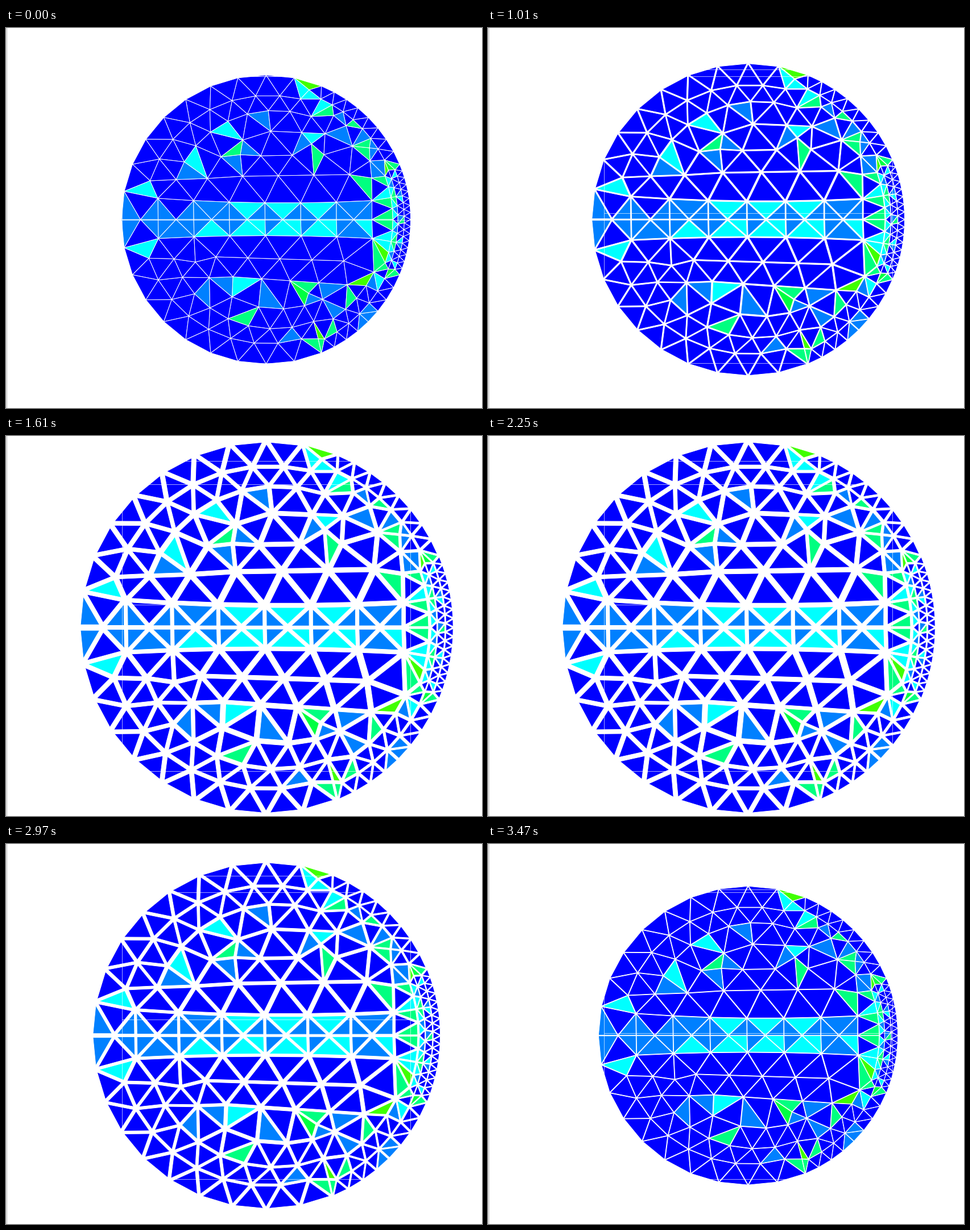
A matplotlib script that plays this animation: 837x669 px, repeating every 3830 ms.

```python
import numpy as np
import matplotlib.pyplot as plt
from matplotlib.animation import FuncAnimation
from matplotlib.collections import LineCollection, PolyCollection
from matplotlib.tri import Triangulation

W, H, DPI = 837, 669, 128
LOOP, TICK = 3830, 10
PIXEL = 72 / DPI
CENTER = np.array([457.3, 337.2])
RADIUS = 254.3

# Triangles are coloured by shape, from flat to nearly equilateral.
QUALITY_STEPS = [0.5, 0.6, 0.748, 0.81, 0.875]
PALETTE = np.array(
    ["#40ff00", "#00ff40", "#00ff80", "#00ffff", "#0080ff", "#0000ff"])

# Vertices that break the regular rows and rings.
EXTRA = [(533, 109), (518, 125), (576, 154), (598, 172), (561, 186),
         (537, 204), (609, 208), (639, 211), (640, 234), (643, 264),
         (412, 223), (333, 412), (532, 467), (549, 547)]


def arc(count, radii, degrees, bulge=0):
    t = np.linspace(0, 1, count)
    radius = radii[0] + (radii[1] - radii[0]) * t
    angle = degrees[0] + (degrees[1] - degrees[0]) * t
    angle = np.radians(angle + bulge * np.sin(np.pi * t))
    return CENTER + np.column_stack(
        [radius * np.cos(angle), -radius * np.sin(angle)])


def row(count, start, end):
    return np.linspace(start, end, count)


def build_points():
    rim = [
        arc(17, (RADIUS, RADIUS), (-22.5, 22.5)),
        arc(7, (RADIUS, RADIUS), (28.125, 61.875)),
        arc(21, (RADIUS, RADIUS), (67.5, 292.5)),
        arc(7, (RADIUS, RADIUS), (298.125, 331.875)),
    ]
    fine = [
        arc(16, (243, 243), (-21.1, 21.1)),
        arc(12, (232, 232), (-22, 22)),
        arc(9, (223, 223), (-20, 20)),
    ]
    upper = [
        arc(8, (219, 215), (83.7, 161.5)),
        arc(9, (173, 198), (156, 66.4)),
        arc(5, (126, 165.5), (145, 67.7)),
        arc(8, (233, 233), (65.6, 26.7)),
        row(3, (448, 225), (559, 223)),
        row(4, (416, 261), (604, 258)),
    ]
    lower = [
        arc(9, (217, 219), (198.3, 286.5)),
        arc(9, (176, 198), (203.2, 295)),
        arc(6, (143, 172), (225.7, 305.3), bulge=8),
        arc(7, (234, 233), (296, 333.5)),
        arc(5, (211, 211), (304, 334)),
        row(5, (369, 403), (594, 410)),
        row(5, (399, 438), (600, 452)),
    ]
    u = np.linspace(-1, 1, 7)
    band_x = 455.3 + 188.3 * u
    band = [
        np.column_stack([band_x, 308 - 6 * (u - 0.17) ** 2]),
        np.column_stack([band_x + 1, 365.5 + 5 * u ** 2]),
        row(7, (267.5, 337.2), (643.5, 337.2)),
        row(7, (236.5, 337.2), (611.5, 337.2)),
    ]
    return np.vstack(rim + fine + upper + lower + band + [EXTRA])


def quality(corners):
    """Twice the inradius over the circumradius: 1 when equilateral."""
    sides = np.linalg.norm(corners - np.roll(corners, 1, axis=1), axis=2)
    a, b, c = sides.T
    return (a + b - c) * (b + c - a) * (c + a - b) / (a * b * c)


points = build_points()
mesh = Triangulation(points[:, 0], points[:, 1])
triangles = points[mesh.triangles]
offsets = triangles.mean(axis=1, keepdims=True) - CENTER
colors = PALETTE[np.digitize(quality(triangles), QUALITY_STEPS)]

# Explosion strength over time, held between 50 ms steps.
KEY_TIMES = [860, 1410, 1610, 2249, 2250, 2720, 3470]
KEY_VALUES = [0.0325, 0.2205, 0.298, 0.298, 0.2895, 0.2895, 0.0325]


def strength(ms):
    if ms < 430:
        return 0.0
    if ms < 860:
        return 0.0163
    return float(np.interp((ms - 10) // 50 * 50 + 10, KEY_TIMES, KEY_VALUES))


fig = plt.figure(figsize=(W / DPI, H / DPI), dpi=DPI, facecolor="white")
ax = fig.add_axes([0, 0, 1, 1])
ax.set(xlim=(0, W), ylim=(H, 0))
ax.axis("off")
ax.plot([0.5, 0.5], [0, H], color="#b0b0b0", lw=PIXEL)
faces = ax.add_collection(PolyCollection(
    triangles, facecolors=list(colors), edgecolors="white", linewidths=PIXEL))
guides = ax.add_collection(LineCollection(
    [], colors="white", linewidths=PIXEL, alpha=0.65))


def draw(frame):
    power = strength(frame * TICK)
    faces.set_verts(triangles + power * offsets)
    left, right, top, bottom = 204.5, 711.5, 84.5, 589.5
    lift = 137 * power
    levels = [top, bottom, top - lift, 337.5 - lift]
    lines = [[(left, y), (right, y)] for y in levels]
    lines += [[(x, top - lift), (x, bottom)] for x in (left, right)]
    guides.set_segments(lines)
    return faces, guides


anim = FuncAnimation(fig, draw, frames=LOOP // TICK, interval=TICK,
                     repeat=True, repeat_delay=0, blit=False)
plt.show()
```
